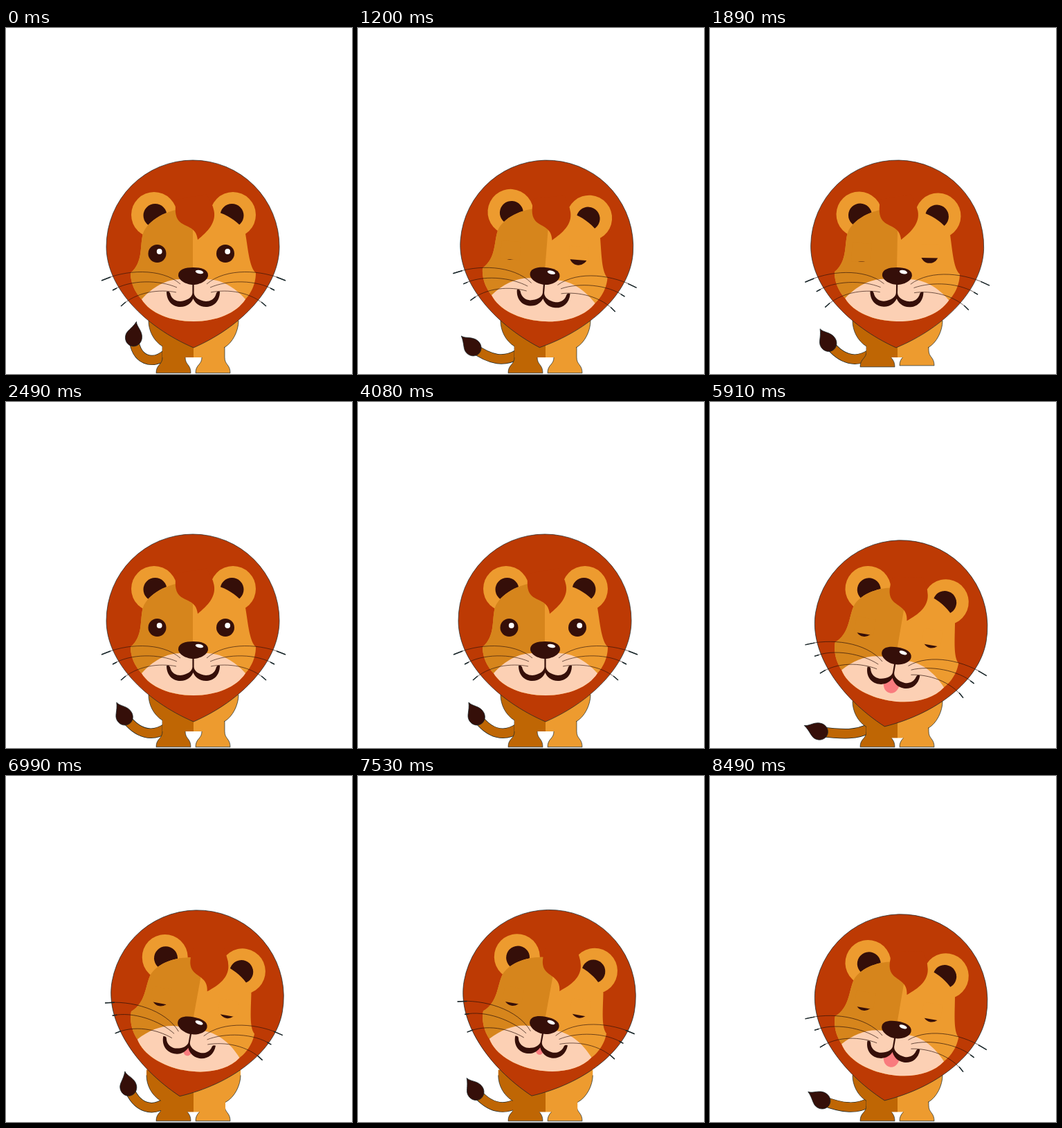
Animation, 500 px wide and 500 px high, one loop 9000 ms. Source, as an HTML page:

```html
<!DOCTYPE html>
<html lang="en">
<head>
<meta charset="utf-8">
<title>Lion</title>
<style>
html, body { margin: 0; width: 100%; height: 100%; overflow: hidden; background: #fff; }
svg { display: block; width: 100%; height: 100%; }
.mane { fill: #bd3a04; }
.light { fill: #ed9b2f; }
.mid { fill: #d6851c; }
.brown { fill: #bf6604; }
.dark { fill: #350f09; }
.white { fill: #fff; }
.edge { stroke: #17262a; stroke-width: .7; }
.line { fill: none; stroke: #17262a; stroke-width: .7; }
.whisker path { fill: none; stroke: #2b120b; stroke-width: .65; }
.whisker .tip { stroke: #17262a; stroke-width: 1.5; }
#tailEdge, #tailFill { fill: none; }
</style>
</head>
<body>
<svg viewBox="0 0 500 500">
  <defs>
    <clipPath id="leftHalf"><rect x="150" y="240" width="120" height="200"/></clipPath>
    <path id="face" d="M270.5 261C235 259 205 278 198 297C193 314 199 338 180 354C180 374 192 388 196 392C208 412 238 424 271 424C304 424 333 412 346 392C350 388 361 374 361 354C352 346 350 322 346 297C338 278 306 259 270.5 261Z"/>
    <g id="whiskers" class="whisker">
      <path d="M138 365C172 349 224 346 252 370M154 379C180 363 222 364 247 375M166 402C188 381 222 377 246 382"/>
      <path class="tip" d="M138 365L151 360M154 379L160 376M166 402L173 396"/>
    </g>
    <g id="ear"><circle class="light" cx="214" cy="270" r="33"/><circle class="dark" cx="215.5" cy="271" r="17"/></g>
    <g id="eye"><circle class="dark" r="13"/><circle class="white" cx="3.2" cy="-3" r="3.9"/></g>
    <path id="leg" d="M226 450V476C226 487 217 486 217 498.6H267C267 486 259 487 259 476V450Z"/>
  </defs>

  <g id="tail">
    <path id="tailEdge" stroke="#17262a" stroke-width="14.4"/>
    <path id="tailFill" stroke="#bf6604" stroke-width="13"/>
    <path id="tuft" class="dark edge" d="M0-23C1-16 12-11 12 0C12 8 6 13 0 13C-6 13-12 8-12 0C-12-8-5-11 0-23Z"/>
  </g>

  <g id="legL"><use href="#leg" class="brown edge"/></g>
  <g id="legR"><use href="#leg" class="light edge" x="57"/></g>

  <g id="torso">
    <path class="brown" d="M206 415V423C206 437 213 452 226 460V476H271V415Z"/>
    <path class="light" d="M336 415V423C336 437 328 455 315 462V476H271V415Z"/>
    <path class="line" d="M206 423C206 437 213 452 226 460M336 423C336 437 328 455 315 462"/>
  </g>

  <g id="head">
    <path class="mane edge" d="M145 316A125 125 0 0 1 395 316C395 375 340 432 271 462C201 432 145 375 145 316Z"/>
    <g id="ears">
      <use href="#ear"/>
      <use href="#ear" transform="matrix(-1 0 0 1 542 0)"/>
    </g>
    <use href="#face" class="light"/>
    <use href="#face" class="mid" clip-path="url(#leftHalf)"/>
    <path id="forelock" class="mane" d="M246 248C244 262 244 272 250 279C258 288 275 286 277 306C292 294 304 281 300.5 264Q299 257 296 252L290 240Z"/>
    <path fill="#fcd0b4" d="M196 392C212 374 232 363 252 363H290C310 363 330 374 346 392C333 412 304 424 271 424C238 424 208 412 196 392Z"/>

    <g transform="translate(218.5 326)">
      <use href="#eye"/>
      <rect id="lidL" class="mid" x="-14" y="-14" width="28"/>
    </g>
    <g transform="translate(317 326)">
      <use href="#eye"/>
      <rect id="lidR" class="light" x="-14" y="-14" width="28"/>
    </g>

    <path id="tongue" fill="#f97b7e" d="M-12 4C-12 16-7 22 0 22S12 16 12 4L0-2Z"/>
    <path class="dark" d="M232 381C232 396 242 403 252 403C262 403 268 397 270.5 391C273 397 279 403 289 403C299 403 309 396 309 381Q305 380 304 383C302 392 295 395 289 395C279 394 272 389 271.6 383V368H269.4V383C269 389 262 394 252 395C246 395 239 392 237 383Q236 380 232 381Z"/>
    <path class="dark" d="M249 357C249 349 259 346 270.5 346S292 349 292 357C292 365 280 371 270.5 371S249 365 249 357Z"/>
    <ellipse class="white" cx="279.5" cy="352.5" rx="5.8" ry="2.6" transform="rotate(10 279.5 352.5)"/>
    <g id="whiskL"><use href="#whiskers"/></g>
    <g id="whiskR"><use href="#whiskers" transform="matrix(-1 0 0 1 542 0)"/></g>
  </g>
</svg>

<script>
const LOOP = 9000;
const $ = id => document.getElementById(id);
const move = (id, transform) => $(id).setAttribute('transform', transform);

// Progress from 0 to 1 between two times: steady, eased, and there and back.
const ramp = (t, from, to) => Math.min(1, Math.max(0, (t - from) / (to - from)));
const ease = (t, from, to) => (1 - Math.cos(Math.PI * ramp(t, from, to))) / 2;
const bump = (t, from, peak, to) => ease(t, from, peak) - ease(t, peak, to);

// The tail swings as a cosine; the tuft follows an arc as the angle drops.
function drawTail(t) {
  const turns = 1.75 * ramp(t, 375, 2490) + 0.75 * ramp(t, 4080, 4980) + 0.88 * ease(t, 6360, 7890);
  const drop = (1 - Math.cos(2 * Math.PI * turns)) / 2;
  const x = 184.5 - 27 * drop;
  const y = 447 + 29 * drop * drop;
  const d = `M232 471C212 ${488 - 7 * drop} ${187 + 7 * drop} 481 ${x} ${y}`;
  $('tailEdge').setAttribute('d', d);
  $('tailFill').setAttribute('d', d);
  move('tuft', `translate(${x} ${y}) rotate(${10 - 78 * drop})`);
}

function drawBody(t, lift) {
  const hop = bump(t, 360, 800, 1180) + bump(t, 1290, 1860, 2190);
  const sink = 9.5 * ease(t, 4400, 5500) - 4 * bump(t, 4080, 4500, 5000);
  move('legL', `translate(0 ${-9 * hop})`);
  move('legR', `translate(0 ${-11 * hop})`);
  move('torso', `translate(271 ${sink}) scale(${1 + 0.06 * lift} 1) translate(-271 0)`);
}

function drawHead(t, lift) {
  const tilt = 4.5 * bump(t, 360, 1260, 2190) + 9.7 * ease(t, 4080, 5640) + 0.8 * lift;
  const y = 8.4 * ease(t, 4400, 5500) - 8 * bump(t, 4080, 4500, 5000) - 7.8 * lift;
  const sway = 11 * lift - 2.5 * bump(t, 1290, 1850, 2190);
  const blink = ease(t, 360, 700) - ease(t, 1920, 2190);
  const doze = ease(t, 4080, 4480);
  const tongue = ease(t, 4800, 5640) - 0.62 * lift;

  move('head', `translate(0 ${y}) rotate(${tilt} 270.5 351)`);
  move('ears', `translate(0 ${-0.2 * sway})`);
  move('forelock', `translate(${0.7 * sway} 0)`);
  move('tongue', `translate(270.5 391) scale(${tongue})`);
  move('whiskL', `rotate(${sway} 250 374)`);
  move('whiskR', `rotate(${-sway} 292 374)`);
  $('lidL').setAttribute('height', 26.4 * blink + 23 * doze);
  $('lidR').setAttribute('height', 19.4 * blink + 23 * doze);
}

function draw(t) {
  const lift = bump(t, 6360, 7290, 8190);
  drawTail(t);
  drawBody(t, lift);
  drawHead(t, lift);
}

const start = performance.now();
function tick() {
  draw((performance.now() - start) % LOOP);
  requestAnimationFrame(tick);
}
tick();
</script>
</body>
</html>
```
